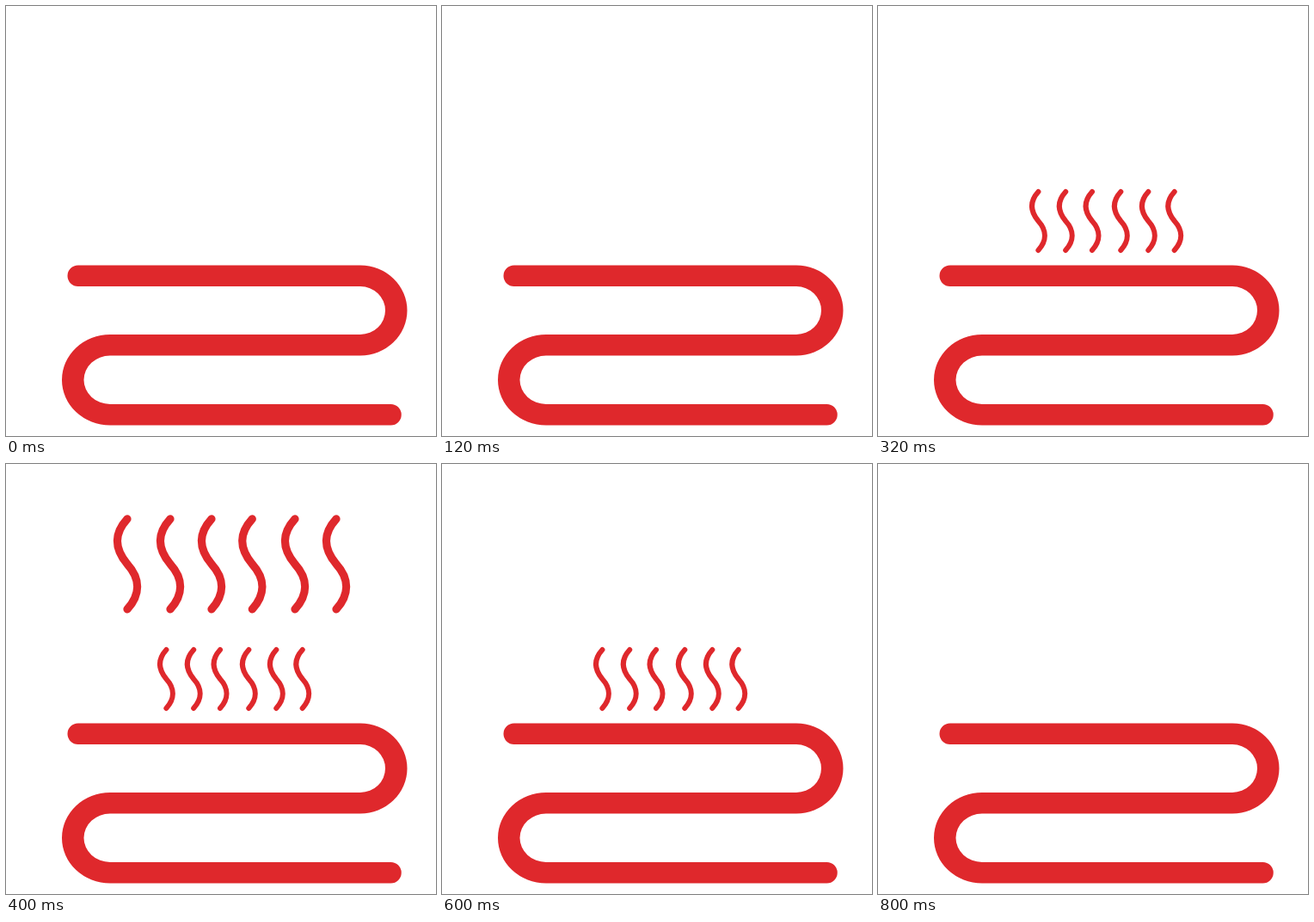
Animation of 500x500 px, one loop 900 ms. Source, as an HTML page:

```html
<!DOCTYPE html>
<html lang="en">
<head>
<meta charset="utf-8">
<title>Floor heating</title>
<style>
  html, body { margin: 0; width: 100%; height: 100%; overflow: hidden; background: #fff; }
  svg { display: block; width: 100%; height: 100%; }
  .steam { fill: none; stroke: #df282c; stroke-width: 6; stroke-linecap: round; opacity: 0; }
</style>
</head>
<body>
<svg viewBox="0 0 500 500">
  <path fill="#df282c" d="M83.75 301.5H412A54.5 52.5 0 0 1 412 406.5H121A30.5 28.25 0 0 0 121 463H447.5a12.25 12.25 0 0 1 0 24.5H121A56 52.75 0 0 1 121 382H412A29 28 0 0 0 412 326H83.75a12.25 12.25 0 0 1 0 -24.5Z"/>
  <g class="steam" id="low"></g>
  <g class="steam" id="high"></g>
</svg>
<script>
const LOOP = 900;
const WAVE = 'M0 0C-10 11 -10 22 0 34C10 45 10 57 0 68';

const rows = [
  { id: 'low', y: 216, scale: 1, xs: [186.4, 218.2, 249, 282.3, 314.3, 344.7], on: 200, off: 800 },
  { id: 'high', y: 63.9, scale: 1.544, xs: [141, 191, 239, 286.3, 336, 384], on: 400, off: 600 }
];

for (const { id, y, scale, xs, on, off } of rows) {
  const group = document.getElementById(id);
  for (const x of xs) {
    const wave = document.createElementNS('http://www.w3.org/2000/svg', 'path');
    wave.setAttribute('d', WAVE);
    wave.setAttribute('transform', `translate(${x} ${y}) scale(${scale})`);
    group.append(wave);
  }
  const step = (time, opacity) => ({ offset: time / LOOP, opacity, easing: 'step-end' });
  group.animate([step(0, 0), step(on, 1), step(off, 0), step(LOOP, 0)],
    { duration: LOOP, iterations: Infinity });
}
</script>
</body>
</html>
```
